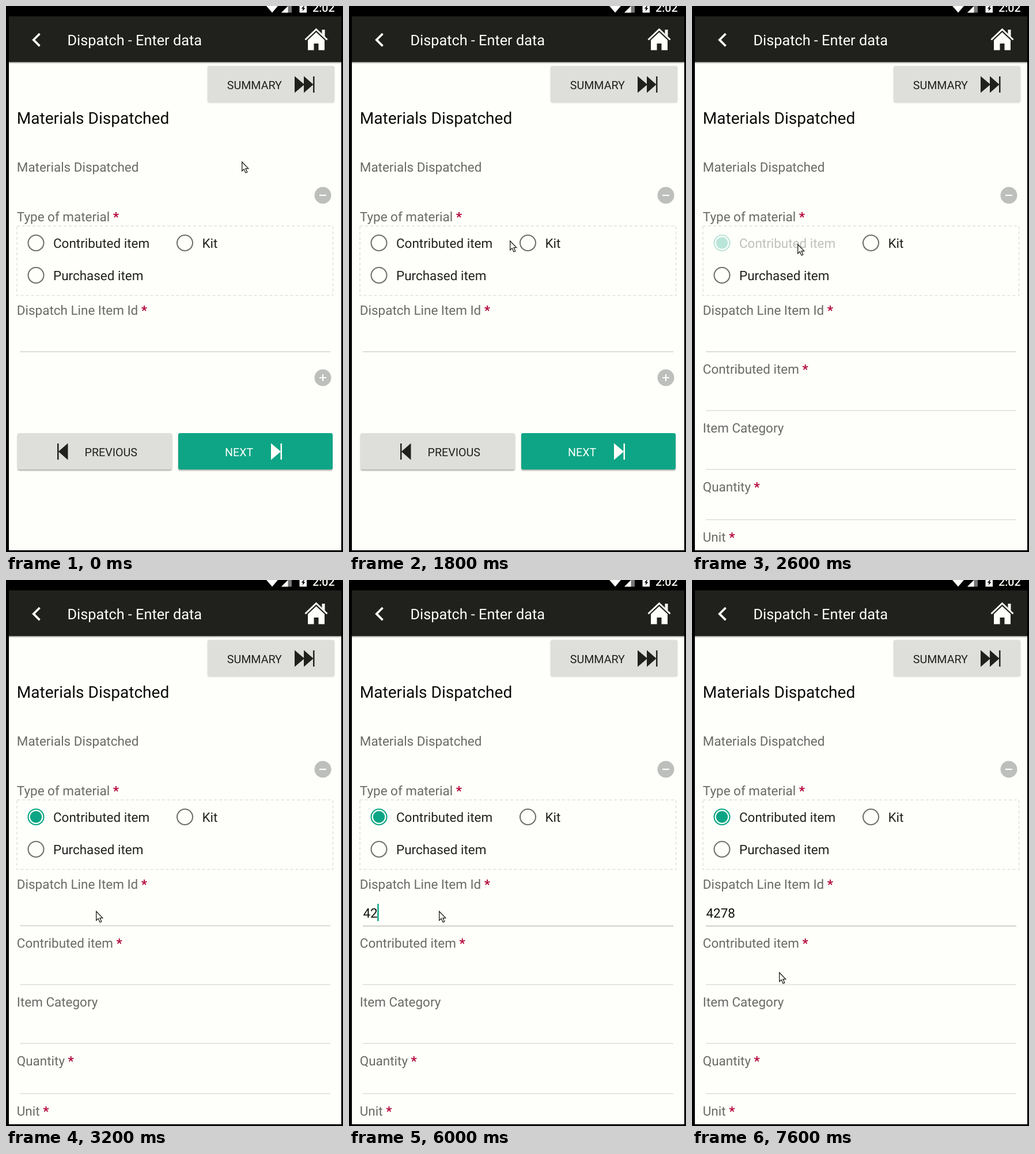
An HTML page for the animation above (8 s loop, 585x946 px).

```html
<!DOCTYPE html>
<html lang="en">
<head>
<meta charset="utf-8">
<title>Dispatch form</title>
<style>
  html, body { margin: 0; width: 100%; height: 100%; overflow: hidden; background: #000; }
  svg { display: block; width: 585px; height: 946px; }
  text { font-family: Roboto, sans-serif; font-size: 22.46px; fill: #20201c; text-rendering: geometricPrecision; white-space: pre; }
  .label { fill: #696a66; }
  .required { fill: #b3063a; font-weight: 700; }
  .heading { font-size: 28.07px; fill: #0a0a08; }
  .button { font-size: 19.65px; }
  .light { fill: #fefffa; }
  .rule { stroke: #dcddd8; stroke-width: 2; }
  .radio { fill: none; stroke: #70716d; stroke-width: 2.1; }
</style>
</head>
<body>
<svg viewBox="0 0 585 946">
  <defs>
    <linearGradient id="shade" x2="0" y2="1">
      <stop offset="0" stop-color="#000" stop-opacity=".45"/>
      <stop offset="1" stop-color="#000" stop-opacity="0"/>
    </linearGradient>
    <filter id="lift" x="-5%" y="-10%" width="110%" height="130%">
      <feDropShadow dx="0" dy="2" stdDeviation="1.3" flood-opacity=".32"/>
    </filter>
    <filter id="soft" x="-5%" y="-10%" width="110%" height="130%">
      <feDropShadow dx="0" dy="0.5" stdDeviation="1" flood-opacity=".2"/>
    </filter>
    <clipPath id="screen"><rect x="5" y="18" width="577" height="925"/></clipPath>
  </defs>
  <rect width="585" height="946"/>

  <g id="status" fill="#fefffa">
    <path d="M452 0H472L462 11.5Z"/>
    <path d="M478 11.5L489.5 0H496V11.5Z" fill="#777"/>
    <path d="M478 11.5L489.5 0V11.5Z"/>
    <path d="M509.500 0H522V11.500H509.500Z"/>
    <path d="M517 0L512.500 4.500H515.500L514.500 9L519.500 3.500H516.500L518 0Z" fill="#000"/>
    <text class="light" x="532" y="9.500" style="font-size:19.65px;font-weight:500">2:02</text>
  </g>

  <g clip-path="url(#screen)">
    <rect x="5" y="18" width="578" height="925" fill="#fefffa"/>
    <rect x="5" y="97" width="578" height="3" fill="url(#shade)"/>
    <rect x="5" y="18" width="578" height="79" fill="#20201c"/>
    <path d="M58.500 48L47.800 58.700L58.500 69.400" fill="none" stroke="#fefffa" stroke-width="3.800"/>
    <text class="light" x="106.500" y="68" style="font-size:25.27px">Dispatch - Enter data</text>
    <path d="M519.500 58.500L538.500 40.500L557.500 58.500" fill="none" stroke="#fefffa" stroke-width="3"/>
    <path d="M548.500 41H553.500V53L548.500 48ZM538.500 45.500L553 59V76.500H542.500V65H534.500V76.500H524V59Z" fill="#fefffa"/>

    <rect x="350" y="104" width="220" height="63" rx="3" fill="#dedfda" filter="url(#soft)"/>
    <text class="button" x="383.800" y="143.500">SUMMARY</text>
    <path d="M501 121.500L518 136L501 150.500ZM517 121.500L533.500 136L517 150.500ZM533 122H535.500V150H533Z" fill="#20201c"/>

    <text class="heading" x="18.800" y="203.500">Materials Dispatched</text>
    <g id="form"></g>
    <rect x="19" y="381" width="548.500" height="120.500" fill="none" stroke="#dfe0db" stroke-width="1.500" stroke-dasharray="5 4"/>

    <g id="choice">
      <circle id="ring" class="radio" cx="52" cy="410.500" r="13.500"/>
      <circle id="dot" cx="52" cy="410.500" r="10.200" fill="#0ba585"/>
      <text x="82" y="419">Contributed item</text>
    </g>
    <circle class="radio" cx="310.500" cy="410.500" r="13.500"/>
    <text x="340.500" y="419">Kit</text>
    <circle class="radio" cx="52" cy="466.500" r="13.500"/>
    <text x="82" y="475">Purchased item</text>

    <g stroke="#fefffa" stroke-width="2.200">
      <circle cx="550" cy="328" r="14.500" fill="#bcbfbc" stroke="none"/>
      <path d="M544 328H556"/>
    </g>

    <path id="focusLine" class="rule" d="M24 599H563"/>
    <text id="entry" x="24.500" y="585" style="fill:#10100e"></text>
    <rect id="caret" y="561" width="2.500" height="30" fill="#0ba585"/>

    <g id="footer">
      <g stroke="#fefffa" stroke-width="2.200">
        <circle cx="550" cy="644" r="14.500" fill="#bcbfbc" stroke="none"/>
        <path d="M544 644H556M550 638V650"/>
      </g>
      <rect x="20" y="740" width="268" height="63" rx="3" fill="#dedfda" filter="url(#lift)"/>
      <rect x="299" y="740" width="268" height="63" rx="3" fill="#0ba585" filter="url(#lift)"/>
      <path d="M107.500 757.500V786.500L91 772ZM89 758H91.500V786H89Z" fill="#20201c"/>
      <text class="button" x="136.600" y="779.500">PREVIOUS</text>
      <text class="button light" x="380" y="779.500">NEXT</text>
      <path d="M460 757.500V786.500L477 772ZM476.500 758H479V786H476.500Z" fill="#fefffa"/>
    </g>
    <g id="extra"></g>
  </g>

  <path id="cursor" d="M.7 1.200V16.800L4.200 13.600L7 20L9.800 18.800L7 12.600H11.700Z" fill="#fefffa" stroke="#20201c" stroke-width="1.300"/>
</svg>
<script>
const LOOP = 8000;
const $ = id => document.getElementById(id);

const label = (text, y, required) =>
  `<text class="label" x="18.800" y="${y}">${text}${required ? ' <tspan class="required">*</tspan>' : ''}</text>`;
const rule = y => `<path class="rule" style="stroke-width:1.600" d="M24 ${y}H563"/>`;

$('form').innerHTML =
  label('Materials Dispatched', 287) +
  label('Type of material', 373, true) +
  label('Dispatch Line Item Id', 534.5, true);
$('extra').innerHTML =
  label('Contributed item', 637, true) + rule(701) +
  label('Item Category', 739) + rule(803) +
  label('Quantity', 841, true) + rule(890) +
  label('Unit', 928, true);

// Each track lists [start time, value]; a value holds until the next one.
const cursorTrack = [
  [0, [409, 269]], [600, [372, 292]], [700, [270, 360]], [800, [165, 418]],
  [900, [135, 425]], [1000, [158, 409.5]], [1600, [254, 407]], [1800, [279, 406]],
  [1900, [273, 408]], [2100, [183, 412]], [2700, [181, 425]], [2800, [168, 466]],
  [2900, [159, 497]], [3100, [157, 551]], [3200, [156, 573]],
  [7200, [153, 632]], [7300, [152, 671]], [7600, [151, 679]]
];
const fadeTrack = [[0, 1], [2300, 0.2], [2600, 0.28], [2700, 0.55], [2800, 0.8], [2900, 1]];
const entryTrack = [[0, ''], [5400, '4'], [6000, '42'], [6800, '427'], [6900, '4278']];
const caretTrack = [[0, false], [3600, true], [4500, false], [5000, true],
  [6600, false], [6800, true], [7500, false]];

const at = (track, t) => track.findLast(([start]) => start <= t)[1];
const show = (id, on) => $(id).setAttribute('visibility', on ? 'visible' : 'hidden');

function draw(t) {
  const opened = t >= 2600;
  const focused = t >= 3600;
  const entry = at(entryTrack, t);
  show('footer', !opened);
  show('extra', opened);
  show('dot', opened);
  $('ring').style.stroke = opened ? '#0ba585' : '';
  $('choice').setAttribute('opacity', at(fadeTrack, t));
  $('focusLine').style.strokeWidth = focused ? 3 : 2;
  $('focusLine').setAttribute('transform', `translate(0 ${focused ? 0.5 : 0})`);
  $('entry').textContent = entry;
  show('caret', at(caretTrack, t));
  $('caret').setAttribute('x', 24 + 12.6 * entry.length);
  $('cursor').setAttribute('transform', `translate(${at(cursorTrack, t)})`);
}

const began = performance.now();
function tick() {
  draw((performance.now() - began) % LOOP);
  requestAnimationFrame(tick);
}
tick();
</script>
</body>
</html>
```
